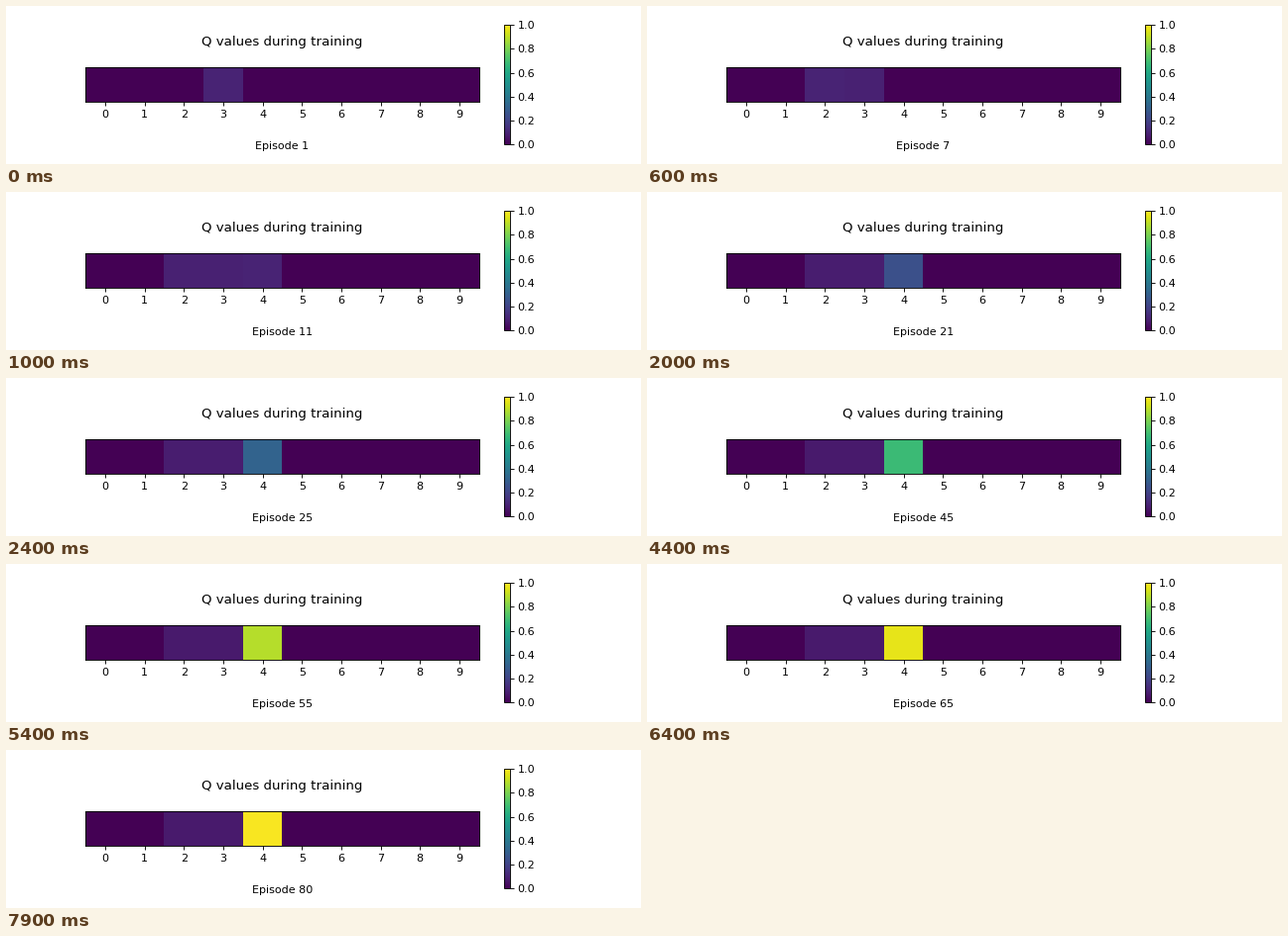
A matplotlib script that plays this animation: 640x160 px, repeating every 8000 ms.

```python
import numpy as np
import matplotlib.pyplot as plt
from matplotlib.animation import FuncAnimation

W, H, DPI = 640, 160, 80
ARMS, EPISODES, RATE = 10, 80, 0.1

plt.rcParams["font.family"] = "DejaVu Sans"
plt.rcParams["font.size"] = 10

# Episodes in which an arm paid out or came up empty
WINS = {
    2: [5],
    3: [1],
    4: [8, 14, 17, 23, 26, 29, *range(34, 46, 2), *range(46, EPISODES + 1)],
}
LOSSES = {2: [10, 15, 30], 3: [6, 18, 43], 4: [20, 32]}


def train():
    """Return the Q values after every episode, one row each."""
    q = np.zeros(ARMS)
    rows = []
    for episode in range(1, EPISODES + 1):
        for reward, log in ((1, WINS), (0, LOSSES)):
            for arm, episodes in log.items():
                if episode in episodes:
                    q[arm] += RATE * (reward - q[arm])
        rows.append(q.copy())
    return np.array(rows)


def pixel_axes(fig, left, top, right, bottom):
    return fig.add_axes([left / W, 1 - bottom / H,
                         (right - left) / W, (bottom - top) / H])


history = train()

fig = plt.figure(figsize=(W / DPI, H / DPI), dpi=DPI, facecolor="white")
ax = pixel_axes(fig, 80, 62, 476.8, 97)
cax = pixel_axes(fig, 501.6, 19.2, 507.64, 140)

image = ax.imshow(history[:1], cmap="viridis", vmin=0, vmax=1,
                  aspect="auto", interpolation="nearest")
ax.set_xticks(range(ARMS))
ax.set_yticks([])
fig.colorbar(image, cax=cax, ticks=np.linspace(0, 1, 6))

center = 278.4 / W
fig.text(center, 1 - 40 / H, "Q values during training", fontsize=12,
         ha="center", va="baseline")
label = fig.text(center, 1 - 145 / H, "", ha="center", va="baseline")


def update(i):
    image.set_data(history[i:i + 1])
    label.set_text(f"Episode {i + 1}")
    return image, label


anim = FuncAnimation(fig, update, frames=EPISODES, interval=100,
                     repeat=True, repeat_delay=0)
plt.show()
```
